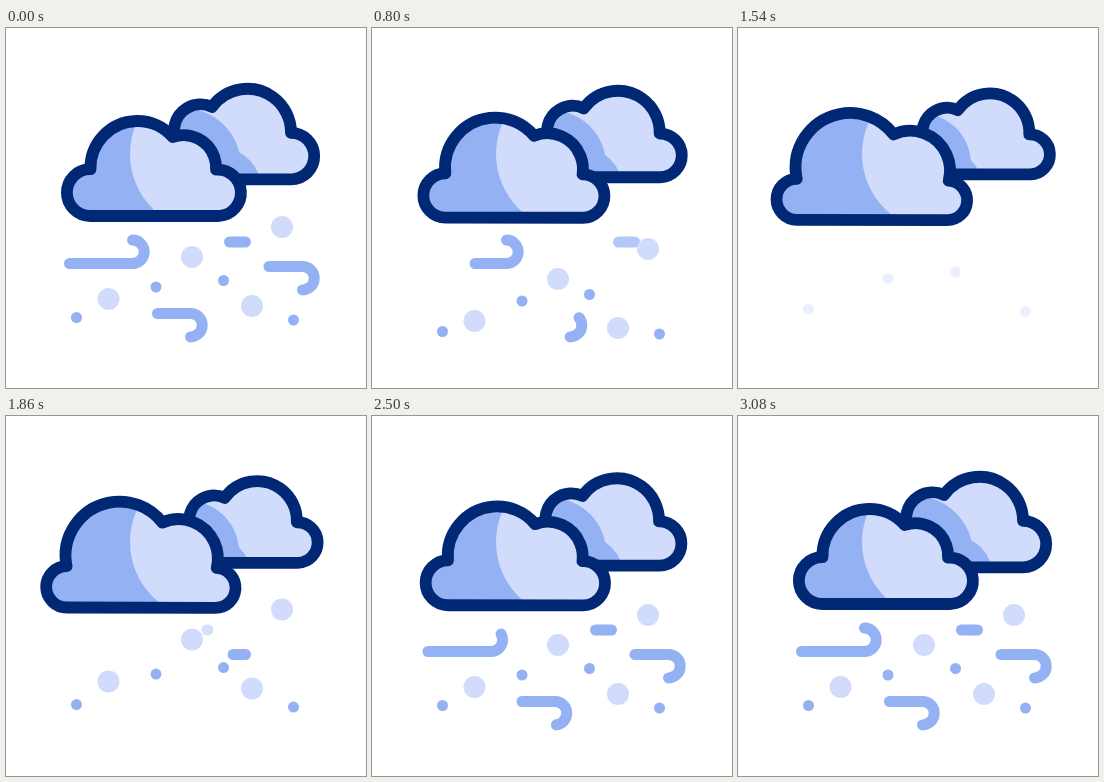
Animation, 360 px wide and 360 px high, one loop 3100 ms. Source, as an HTML page with a canvas:

```html
<!DOCTYPE html>
<html lang="en">
<head>
<meta charset="utf-8">
<title>Windy snow clouds</title>
<style>
  html, body { margin: 0; width: 100%; height: 100%; overflow: hidden; background: #fff; }
  canvas { display: block; width: 360px; height: 360px; }
</style>
</head>
<body>
<canvas id="stage"></canvas>
<script>
const LOOP = 3100, STEP = 20, HOLD = 120;
const NAVY = '#002875', BLUE = '#94b2f3', PALE = '#d1dcfd';

const canvas = document.getElementById('stage');
const ctx = canvas.getContext('2d');
const ratio = window.devicePixelRatio || 1;
canvas.width = canvas.height = 360 * ratio;
ctx.scale(ratio, ratio);
ctx.lineCap = ctx.lineJoin = 'round';

const part = (t, start, length) => Math.max(0, Math.min(1, (t - start) / length));
const easeInOut = u => u < 0.5 ? 2 * u * u : 1 - 2 * (1 - u) ** 2;

// A circle at rest, and how far it changes at full swell.
const circle = (x, y, r, dx = 0, dy = 0, dr = 0) =>
  s => ({ x: x + dx * s, y: y + dy * s, r: r + dr * s });

// Lobes run left to right. Shades are painted in order over the base colour.
const frontCloud = {
  lobes: [
    circle(84.3, 164.6, 23.4, -24, 6.4, -2.8),
    circle(131.5, 140, 47, -18.3, -0.4, 7.2),
    circle(177.6, 139.7, 32.5, -5.2, 2.8, 7),
    circle(211.7, 164.8, 23.2, -2.2, 7.2, -3.3)
  ],
  base: BLUE, shadeColor: PALE,
  shades: [circle(201, 126, 77)]
};
const backCloud = {
  lobes: [
    circle(186, 131, 20.3, 14, -2.3, -2.3),
    circle(194.4, 102.6, 26.3, 14, 2, -1.3),
    circle(241.4, 104.4, 43.6, 10, 0.4, -4),
    circle(285, 128.1, 23.2, 6.5, -1.6, -3)
  ],
  base: PALE, shadeColor: BLUE,
  shades: [circle(177, 138, 58, 5, -2, -7), circle(215, 160, 40, -10)]
};

// Upper crossing of two neighbouring circles.
function crossing(a, b) {
  const dx = b.x - a.x, dy = b.y - a.y, d = Math.hypot(dx, dy);
  const along = (d * d + a.r * a.r - b.r * b.r) / (2 * d);
  const up = Math.sqrt(Math.max(0, a.r * a.r - along * along));
  return { x: a.x + (dx * along + dy * up) / d, y: a.y + (dy * along - dx * up) / d };
}

function outline(lobes) {
  const path = new Path2D();
  const angle = (c, p) => Math.atan2(p.y - c.y, p.x - c.x);
  lobes.forEach((c, i) => {
    const before = lobes[i - 1], after = lobes[i + 1];
    const from = before ? angle(c, crossing(before, c)) : Math.PI / 2;
    const to = after ? angle(c, crossing(c, after)) : Math.PI / 2;
    path.arc(c.x, c.y, c.r, from, to);
  });
  path.closePath();
  return path;
}

function disc({ x, y, r }, color) {
  ctx.fillStyle = color;
  ctx.beginPath();
  ctx.arc(x, y, r, 0, 2 * Math.PI);
  ctx.fill();
}

function drawCloud(cloud, s) {
  const shape = outline(cloud.lobes.map(lobe => lobe(s)));
  ctx.save();
  ctx.clip(shape);
  ctx.fillStyle = cloud.base;
  ctx.fill(shape);
  cloud.shades.forEach(shade => disc(shade(s), cloud.shadeColor));
  ctx.restore();
  ctx.lineWidth = 11.8;
  ctx.strokeStyle = NAVY;
  ctx.stroke(shape);
}

// Snow falls and fades out, then settles back in from above.
const flakes = { r: 11, color: PALE, fall: 22, power: 1.67, fade: 900, rise: 25, back: 1500, settle: 680,
  at: [[276, 199], [186, 229], [102.5, 271], [246, 278]] };
const dots = { r: 5.5, color: BLUE, fall: 14, power: 1.6, fade: 1120, rise: 12, back: 1450, settle: 570,
  at: [[217.5, 252.5], [70.5, 289.5], [287.5, 292]] };
const earlyDot = { ...dots, fade: 960, at: [[150, 259]] };

function drawSnow(kind, t) {
  const returning = t >= kind.back;
  const shift = returning
    ? -kind.rise * (1 - part(t, kind.back, kind.settle)) ** 2
    : kind.fall * (Math.max(0, t - HOLD) / 680) ** kind.power;
  ctx.globalAlpha = returning ? part(t, kind.back + 50, 200) : 1 - part(t, kind.fade, 220);
  for (const [x, y] of kind.at) disc({ x, y: y + shift, r: kind.r }, kind.color);
  ctx.globalAlpha = 1;
}

// Gusts are lines ending in a hook; turn is -1 for up, 1 for down.
const gusts = [
  { x: 63.5, y: 235.5, line: 63, turn: -1, leave: 532, enter: 2075 },
  { x: 263, y: 238.5, line: 33.5, turn: 1, leave: 170, enter: 1757 },
  { x: 151.5, y: 285.5, line: 33, turn: 1, leave: 440, enter: 1967 }
];

function drawGust({ x, y, line, turn, leave, enter }, t) {
  const r = 11.7, size = line + Math.PI * r;
  const gone = easeInOut(part(t, leave, 600));
  const come = easeInOut(part(t, enter, 620));
  const entering = t >= enter;
  const tail = entering ? 0 : gone ** 1.25;
  const head = entering ? come ** 0.6 : 1;
  if (head - tail < 0.01) return;
  const start = x + (entering ? -38 * (1 - come) : 20 * gone);
  ctx.setLineDash([(head - tail) * size, 999]);
  ctx.lineDashOffset = -tail * size;
  ctx.beginPath();
  ctx.moveTo(start, y);
  ctx.arc(start + line, y + turn * r, r, -turn * Math.PI / 2, turn * Math.PI / 2, turn < 0);
  ctx.stroke();
  ctx.setLineDash([]);
}

// The short dash drifts right and fades, then grows back in from the left.
function drawDash(t) {
  const entering = t >= 1800;
  const come = easeInOut(part(t, 1800, 580));
  const x = 223.5 + (entering ? -23 * (1 - come) : 35 * easeInOut(part(t, 266, 909)));
  ctx.globalAlpha = entering ? part(t, 1800, 150) : 1 - part(t, 700, 350);
  ctx.beginPath();
  ctx.moveTo(x, 214);
  ctx.lineTo(x + 16 * (entering ? Math.max(0.05, come) : 1), 214);
  ctx.stroke();
  ctx.globalAlpha = 1;
}

function draw(t) {
  ctx.fillStyle = '#fff';
  ctx.fillRect(0, 0, 360, 360);
  ctx.lineWidth = 11;
  ctx.strokeStyle = BLUE;
  drawDash(t);
  gusts.forEach(gust => drawGust(gust, t));
  [flakes, dots, earlyDot].forEach(kind => drawSnow(kind, t));

  const wave = (1 - Math.cos(2 * Math.PI * (t - 50) / LOOP)) / 2;
  const swell = 1.06 * wave ** 1.15;
  drawCloud(backCloud, swell);
  drawCloud(frontCloud, swell);
}

const origin = performance.now();
function tick() {
  const t = (performance.now() - origin) % LOOP;
  draw(t < HOLD ? 0 : Math.floor(t / STEP) * STEP);
  requestAnimationFrame(tick);
}
tick();
</script>
</body>
</html>
```
